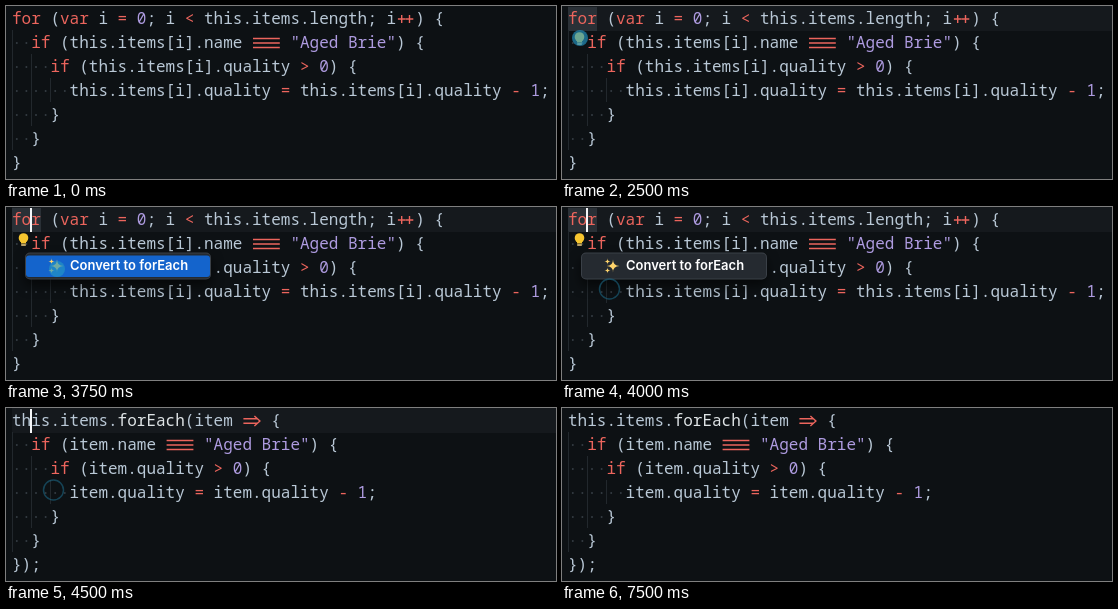
An HTML page with a canvas that plays this animation: 550 px wide and 173 px high, repeating every 8250 ms.

```html
<!DOCTYPE html>
<html lang="en">
<head>
<meta charset="utf-8">
<title>Convert to forEach</title>
<style>
  html, body { margin: 0; width: 100%; height: 100%; overflow: hidden; background: #0d1114; }
  canvas { display: block; }
</style>
</head>
<body>
<canvas id="stage" width="550" height="173"></canvas>
<script>
const ctx = document.getElementById('stage').getContext('2d');
const LOOP = 8250, LEFT = 6, CHAR = 9.6, LINE = 24;
const CODE_FONT = '16px "Noto Sans Mono", "DejaVu Sans Mono", monospace';
const MENU_FONT = '600 13px Inter, Roboto, sans-serif';
const COLOR = {
  bg: '#0d1114', row: '#15191d', word: '#2a3036', guide: '#22282d', dot: '#353c43',
  text: '#b9c8d6', red: '#ec655d', purple: '#ae9be0', method: '#dfe4e6'
};

const before = [
  'for (var i = 0; i < this.items.length; i++) {',
  '  if (this.items[i].name === "Aged Brie") {',
  '    if (this.items[i].quality > 0) {',
  '      this.items[i].quality = this.items[i].quality - 1;',
  '    }', '  }', '}'
];
const after = [
  'this.items.forEach(item => {',
  '  if (item.name === "Aged Brie") {',
  '    if (item.quality > 0) {',
  '      item.quality = item.quality - 1;',
  '    }', '  }', '});'
];

// Pointer steps: start time, kind, x, y
const pointer = [
  [0], [1000, 'ring', 49, 97], [1250, 'dot', 36, 30], [1500, 'dot', 26, 16],
  [1750, 'ring', 21, 36.5], [2250, 'dot', 24.5, 42], [2500, 'dot', 18, 32],
  [2750, 'ring', 12.3, 54], [3250, 'dot', 46, 82], [3500, 'dot', 51, 62],
  [4000, 'ring', 47.5, 82], [4750, 'dot', 51, 62], [5500]
];

const within = (t, a, b) => t >= a && t < b;

function rect(x, y, w, h, color) {
  ctx.fillStyle = color;
  ctx.fillRect(x, y, w, h);
}

function disc(x, y, r, color) {
  ctx.fillStyle = color;
  ctx.beginPath();
  ctx.arc(x, y, r, 0, Math.PI * 2);
  ctx.fill();
}

function rounded(x, y, w, h, r, color) {
  ctx.fillStyle = color;
  ctx.beginPath();
  ctx.roundRect(x, y, w, h, r);
  ctx.fill();
}

function lines(color, width, ...paths) {
  ctx.strokeStyle = color;
  ctx.lineWidth = width;
  ctx.beginPath();
  for (const [x, y, ...rest] of paths) {
    ctx.moveTo(x, y);
    for (let i = 0; i < rest.length; i += 2) ctx.lineTo(rest[i], rest[i + 1]);
  }
  ctx.stroke();
}

// Operators drawn as joined glyphs
const ligatures = {
  '===': (x, y) => lines(COLOR.red, 1.4, ...[-4.5, 0, 4.5].map(d => [x + 1, y + d, x + 27.8, y + d])),
  '++': (x, y) => lines(COLOR.red, 1.4, ...[5.7, 13.5].flatMap(d => [
    [x + d - 3.8, y, x + d + 3.8, y], [x + d, y - 4, x + d, y + 4]])),
  '=>': (x, y) => lines(COLOR.red, 1.4,
    [x + 1, y - 2.2, x + 15, y - 2.2], [x + 1, y + 2.2, x + 15, y + 2.2],
    [x + 12, y - 5, x + 17.5, y, x + 12, y + 5])
};

function tokenColor(token) {
  if (/^(for|var|if)$/.test(token) || /^[=<>+-]/.test(token)) return COLOR.red;
  if (/^["\d]/.test(token)) return COLOR.purple;
  return token === 'forEach' ? COLOR.method : COLOR.text;
}

function drawCode(code) {
  [[6, 24, 120], [25, 48, 72], [44, 72, 24]].forEach(([x, y, h]) => rect(x, y, 1, h, COLOR.guide));
  ctx.font = CODE_FONT;
  ctx.textBaseline = 'alphabetic';
  code.forEach((line, row) => {
    const y = 18 + row * LINE;
    const indent = line.search(/\S/);
    for (let c = 0; c < indent; c++) disc(LEFT + (c + 0.5) * CHAR, y - 5, 1, COLOR.dot);
    for (const match of line.matchAll(/"[^"]*"|\w+|===|=>|\+\+|\S/g)) {
      const token = match[0], x = LEFT + match.index * CHAR;
      if (ligatures[token]) {
        ligatures[token](x, y - 5);
        continue;
      }
      ctx.fillStyle = tokenColor(token);
      [...token].forEach((ch, i) => ctx.fillText(ch, x + i * CHAR, y));
    }
  });
}

function drawBulb() {
  disc(17.5, 31, 4.8, '#f6c52f');
  rect(15, 34, 5, 2.5, '#f6c52f');
  rect(15.2, 37, 4.6, 2, '#b9a066');
}

function sparkle(x, y, r) {
  ctx.fillStyle = '#ffd46b';
  ctx.beginPath();
  ctx.moveTo(x, y - r);
  for (let i = 1; i <= 4; i++) {
    const a = i * Math.PI / 2;
    ctx.quadraticCurveTo(x, y, x + r * Math.sin(a), y - r * Math.cos(a));
  }
  ctx.fill();
}

function drawMenu(alpha, lit) {
  ctx.save();
  ctx.globalAlpha = alpha;
  ctx.shadowColor = 'rgba(0,0,0,.6)';
  ctx.shadowBlur = 12;
  ctx.shadowOffsetY = 6;
  rounded(19, 45.5, 186, 27, 5, '#3a4047');
  ctx.shadowColor = 'transparent';
  rounded(20, 46.5, 184, 25, 4, '#252a30');
  if (lit) rounded(20, 48.5, 184, 21.5, 3, '#1464cc');
  sparkle(51, 59, 6.5);
  sparkle(45.5, 54.5, 3.2);
  sparkle(45.5, 63.5, 3);
  ctx.font = MENU_FONT;
  ctx.textBaseline = 'alphabetic';
  ctx.fillStyle = '#fff';
  ctx.fillText('Convert to forEach', 64, 63);
  ctx.restore();
}

function drawPointer(t) {
  const [, kind, x, y] = pointer.findLast(step => step[0] <= t);
  if (kind === 'dot') disc(x, y, 8, 'rgba(36,150,196,.66)');
  if (kind === 'ring') {
    ctx.strokeStyle = 'rgba(30,110,140,.55)';
    ctx.lineWidth = 1.5;
    ctx.beginPath();
    ctx.arc(x, y, 10, 0, Math.PI * 2);
    ctx.stroke();
  }
}

function caretOn(t) {
  if (!within(t, 1750, 6250)) return false;
  const start = t < 3750 ? 1750 : t < 4500 ? t : 4500;
  return Math.floor((t - start) / 500) % 2 === 0;
}

function draw(t) {
  rect(0, 0, 550, 173, COLOR.bg);
  if (within(t, 1750, 6250)) rect(6, 0, 544, 25, COLOR.row);
  if (within(t, 2000, 4500)) rect(6, 1, 29, 24, COLOR.word);
  drawCode(within(t, 0, 4500) ? before : after);
  if (within(t, 2000, 4500)) drawBulb();
  if (within(t, 2750, 4500)) drawMenu(t < 4250 ? 1 : 0.45, !within(t, 4000, 4250));
  if (caretOn(t)) rect(24, 1, 2, 24, '#f4f6f8');
  drawPointer(t);
}

const begin = performance.now();
function tick() {
  draw((performance.now() - begin) % LOOP);
  requestAnimationFrame(tick);
}
tick();
</script>
</body>
</html>
```
